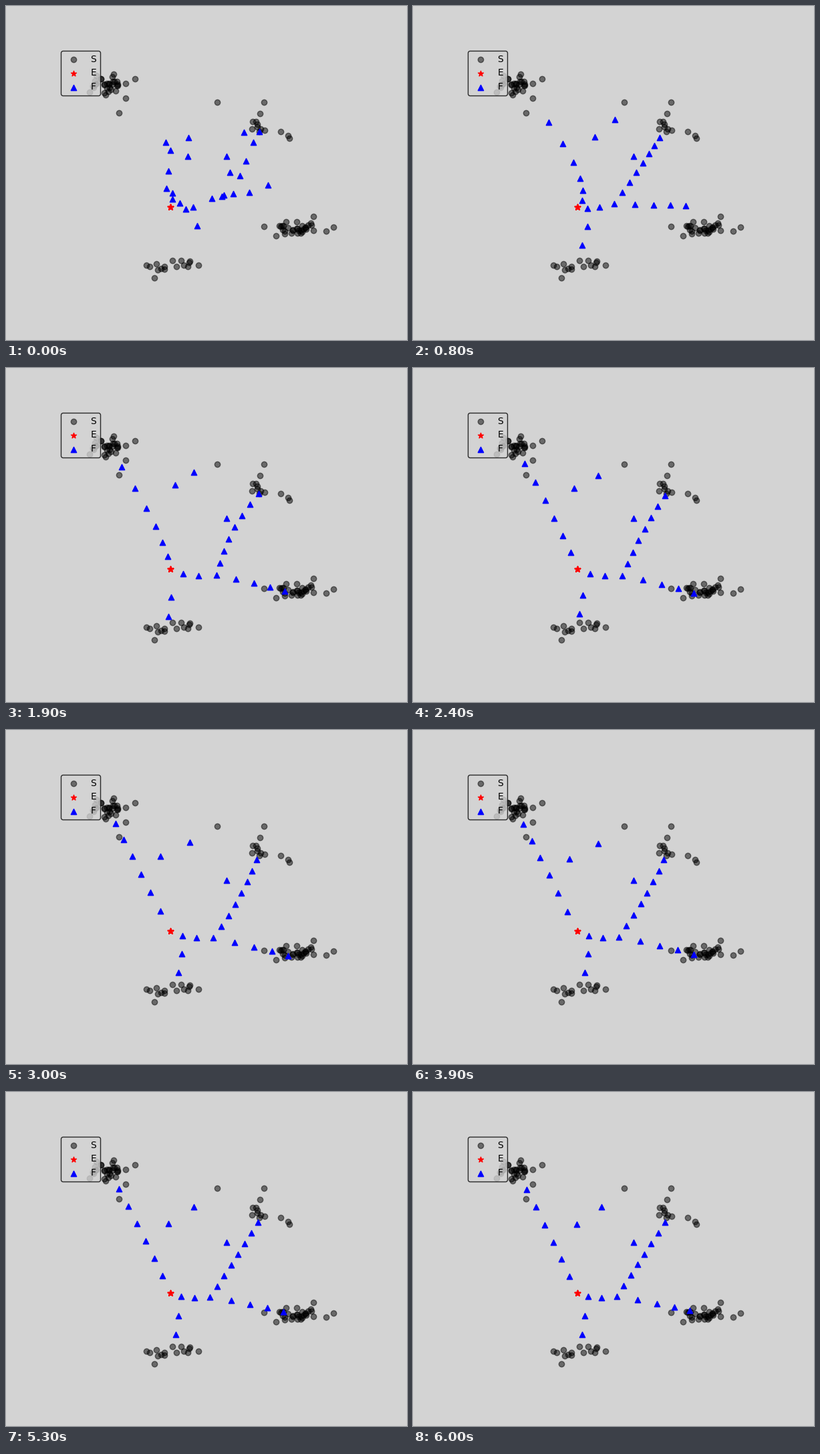
Recreate the animation shown at these times as a matplotlib script. Size 600 px wide and 500 px high, loop 6100 ms.

```python
import numpy as np
import matplotlib.pyplot as plt
from matplotlib.animation import FuncAnimation

FRAMES = 61
STEP_MS = 100
KEYS = np.array([0, 8, 19, 30, 60])  # steps at which the key points hold
BASE = (246, 301)
ANCHOR = (330, 225)

rng = np.random.default_rng(7)
steps = np.arange(FRAMES)


def cluster(center, radii, count):
    """Random sites in an ellipse, denser towards its centre."""
    angle = rng.uniform(0, 2 * np.pi, count)
    reach = rng.uniform(0, 1, count) ** 0.75
    ring = np.column_stack([np.cos(angle), np.sin(angle)])
    return np.array(center) + ring * reach[:, None] * radii


def glide(*points):
    """Smooth path through the key points that never overshoots them."""
    points = np.array(points, float)
    span = np.diff(KEYS)[:, None]
    rate = np.diff(points, axis=0) / span
    before, after = rate[:-1], rate[1:]
    same = before * after > 0
    total = np.where(same, before + after, 1)
    inner = np.where(same, 2 * before * after / total, 0)
    slope = np.vstack([rate[:1], inner, np.zeros((1, 2))])

    k = np.clip(np.searchsorted(KEYS, steps, side="right") - 1, 0, len(KEYS) - 2)
    h = span[k]
    u = (steps - KEYS[k])[:, None] / h
    return ((1 + 2 * u) * (1 - u) ** 2 * points[k]
            + u * (1 - u) ** 2 * h * slope[k]
            + u ** 2 * (3 - 2 * u) * points[k + 1]
            + u ** 2 * (u - 1) * h * slope[k + 1])


def chain(root, tip, count, bend=(0, 0), spread=0):
    """Evenly spaced agents on a bent line; scattered at first, then aligned."""
    root, tip, bend = (np.broadcast_to(p, (FRAMES, 2))[:, None]
                       for p in (root, tip, bend))
    t = np.arange(1, count + 1)[:, None] / count
    line = root + (tip - root) * t + 4 * t * (1 - t) * bend
    noise = spread * rng.uniform(-1, 1, (count, 2)) * (t < 1)
    fade = np.clip(1 - steps / KEYS[1], 0, 1)[:, None, None]
    return line + noise * fade


# Sites: four clusters and a few that stand apart.
lone = [(193, 109), (179, 138), (169, 160), (125, 129),
        (316, 144), (386, 144), (380, 161), (411, 188), (422, 194), (424, 198),
        (386, 330), (404, 344), (460, 315), (479, 337), (490, 331),
        (210, 388), (262, 381), (288, 388), (222, 407)]
sites = np.vstack([
    cluster((154, 117), (28, 18), 30),
    cluster((378, 180), (12, 11), 8),
    cluster((435, 333), (30, 13), 29),
    cluster((250, 391), (36, 13), 12),
    lone])

# Agents: chains that grow from the base towards the clusters.
fork = glide((308, 288), (301, 296), (315, 310), (310, 311), (305, 306))
west = glide((239, 204), (203, 174), (173, 148), (164, 140), (170, 146))
west_bend = glide((3, 8), (25, 20), (14, 12), (-3, -5), (2, 1))
north = glide((379, 188), (369, 197), (378, 188), (375, 194), (377, 195))
north_bend = glide((0, 0), (4, -5), (-9, -2), (5, 0), (0, 0))
east = glide((392, 268), (408, 299), (417, 334), (422, 338), (414, 327))
singles = [
    glide((269, 304), (261, 330), (247, 343), (263, 335), (257, 335)),
    glide((286, 329), (253, 358), (243, 372), (258, 363), (253, 363)),
    glide((272, 225), (272, 196), (253, 175), (231, 189), (245, 198)),
    glide((273, 197), (302, 170), (281, 156), (275, 168), (282, 172)),
    np.broadcast_to(ANCHOR, (FRAMES, 2))]
paths = np.concatenate([
    chain(BASE, fork, 3, bend=(-4, 4), spread=6),
    chain(BASE, west, 6, bend=west_bend, spread=14),
    chain(fork, north, 7, bend=north_bend, spread=14),
    chain(fork, east, 4, bend=(5, 0), spread=16),
    np.stack(singles, axis=1)], axis=1)

fig, ax = plt.subplots(figsize=(6, 5), dpi=100, facecolor="lightgray")
# Default axes area, so one data unit is one pixel.
ax.set_position([0.125, 0.11, 0.775, 0.77])
ax.set_xlim(75, 540)
ax.set_ylim(445, 60)
ax.axis("off")

ax.scatter(sites[:, 0], sites[:, 1], c="black", alpha=0.5, label="S")
# Coincident stars give the mark its heavy edge.
ax.scatter([BASE[0]] * 20, [BASE[1]] * 20, c="red", marker="*", label="E")
agents = ax.scatter(paths[0, :, 0], paths[0, :, 1], c="blue", marker="^", label="F")
ax.legend(loc="upper left", fontsize=10, facecolor="lightgray",
          edgecolor="black", framealpha=0.8)


def update(step):
    agents.set_offsets(paths[step])
    return (agents,)


anim = FuncAnimation(fig, update, frames=FRAMES, interval=STEP_MS,
                     repeat=True, repeat_delay=0, blit=False)
plt.show()
```
